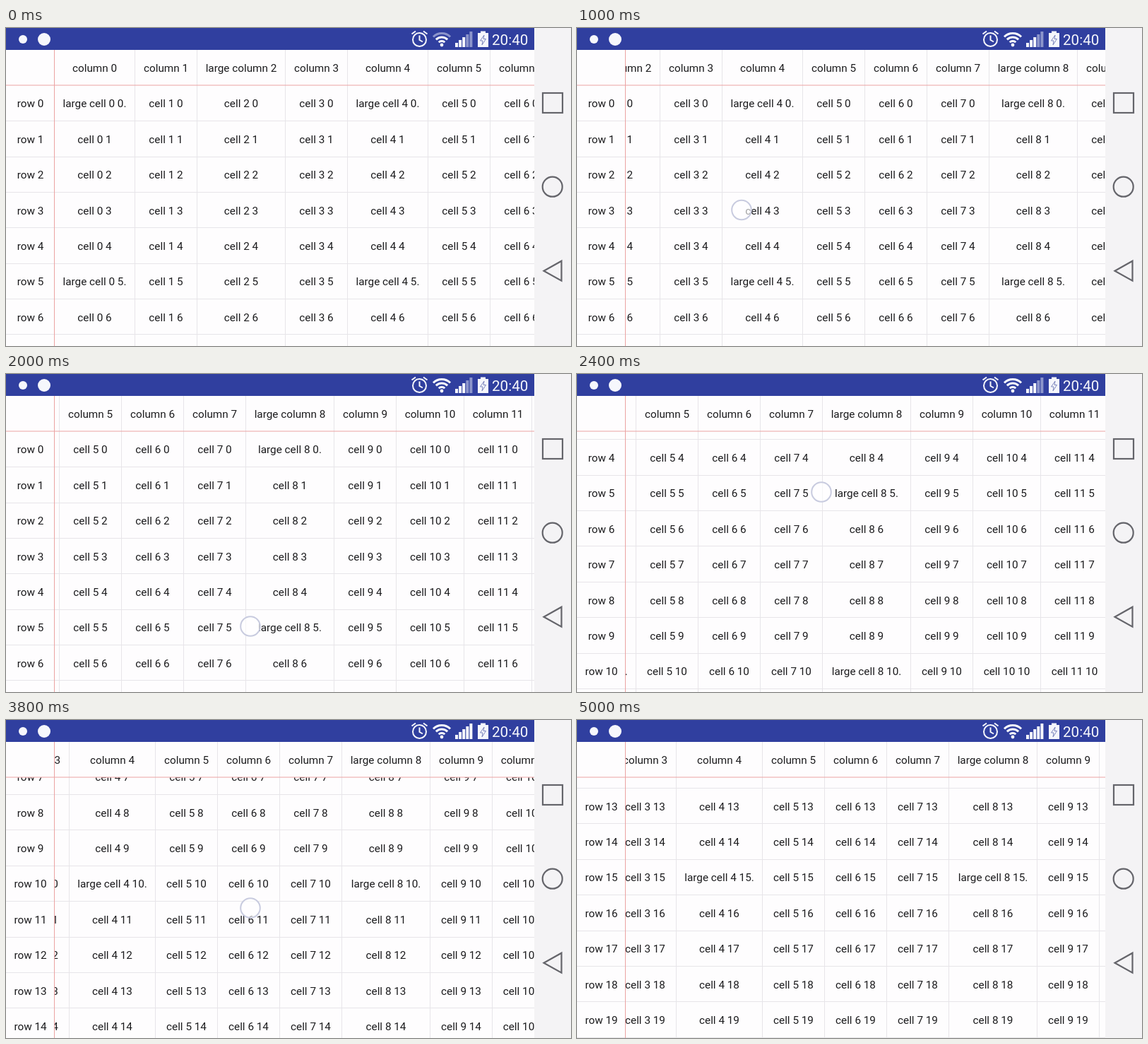
Animation of 800 by 450 pixels, one loop 5.1 s. Source, as an HTML page with a canvas:

```html
<!DOCTYPE html>
<html>
<head>
<meta charset="utf-8">
<style>
html, body { margin: 0; width: 800px; height: 450px; overflow: hidden; background: #fefdfe; }
canvas { display: block; }
</style>
</head>
<body>
<canvas id="stage" width="800" height="450"></canvas>
<script>
const ctx = document.getElementById('stage').getContext('2d');
const LOOP = 5100, STEP = 100;
const LEFT = 68.5, TOP = 81.2, BAR = 31, RIGHT = 748, ROW = 50.4;

// Each gesture: finger drag from start to lift, then a fling until end.
const gestures = [
  { axis: 'x', start: 400, lift: 1000, end: 1600, gone: 1300, from: 0, mid: 278, to: 522, power: 1.5, at: [511, 257.5] },
  { axis: 'y', start: 2000, lift: 2400, end: 2800, gone: 2700, from: 0, mid: 190, to: 379, power: 1.5, at: [346, 357] },
  { axis: 'x', start: 3400, lift: 3900, end: 4200, gone: 4400, from: 522, mid: 362, to: 343, power: 1, at: [218, 266] },
  { axis: 'y', start: 4600, lift: 4800, end: 5000, gone: 4900, from: 379, mid: 510, to: 640, power: 1.5, at: [346, 357] }
];

const clamp = v => Math.max(0, Math.min(1, v));
const progress = (t, a, b) => clamp((t - a) / (b - a));

function dragged(g, t) {
  return g.from + (g.mid - g.from) * progress(t, g.start, g.lift) ** g.power;
}
function scrolled(g, t) {
  const rest = 1 - progress(t, g.lift, g.end);
  return dragged(g, t) + (g.to - g.mid) * (1 - rest * rest);
}

function columnWidth(c, y) {
  if (c % 6 === 2) return 125;
  if (c === 4 && y > 135) return 122; // wider once row 10 is in view
  if (c % 4 === 0) return 114;
  return c < 10 ? 88 : 96;
}

function region(x, y, w, h, draw) {
  ctx.save();
  ctx.beginPath();
  ctx.rect(x, y, w, h);
  ctx.clip();
  draw();
  ctx.restore();
}

function stroke(color, width, ...points) {
  ctx.beginPath();
  points.forEach(p => ctx.lineTo(...p));
  ctx.strokeStyle = color;
  ctx.lineWidth = width;
  ctx.stroke();
}

function arc(x, y, r, a = 0, b = 2 * Math.PI) {
  ctx.beginPath();
  ctx.arc(x, y, r, a, b);
}

function label(text, x, top) {
  ctx.fillStyle = '#1b1b1d';
  ctx.fillText(text, x, top + 31.1);
}

function drawTable(x, y) {
  const grid = '#e7e5e9';
  const columns = [], rows = [];
  for (let c = 0, left = LEFT - x; left < RIGHT; c++) {
    const width = columnWidth(c, y);
    if (left + width > LEFT) columns.push({ c, center: left + width / 2, right: left + width });
    left += width;
  }
  for (let r = Math.floor(y / ROW); TOP + r * ROW - y < 450; r++) rows.push({ r, top: TOP + r * ROW - y });

  ctx.font = '15.3px Roboto, sans-serif';
  ctx.textAlign = 'center';
  region(LEFT, BAR, RIGHT - LEFT, 450 - BAR, () => {
    for (const { c, center, right } of columns) {
      const edge = Math.floor(right) + 0.5;
      stroke(grid, 1, [edge, BAR], [edge, 450]);
      label((c % 6 === 2 ? 'large column ' : 'column ') + c, center, BAR + 0.3);
    }
  });
  region(0, TOP, RIGHT, 450 - TOP, () => {
    for (const { r, top } of rows) {
      const edge = Math.floor(top + ROW) + 0.5;
      stroke(grid, 1, [0, edge], [RIGHT, edge]);
      label('row ' + r, 34.5, top);
    }
  });
  region(LEFT, TOP, RIGHT - LEFT, 450 - TOP, () => {
    for (const { r, top } of rows) for (const { c, center } of columns) {
      const large = c % 4 === 0 && r % 5 === 0;
      label(large ? `large cell ${c} ${r}.` : `cell ${c} ${r}`, center, top);
    }
  });
  stroke('#eba3a3', 1, [LEFT, BAR], [LEFT, 450]);
  stroke('#eba3a3', 1, [0, 81], [RIGHT, 81]);
}

function drawStatusBar(t) {
  const white = '#f6f7fc', dim = '#8c95cb', blue = '#303f9f';
  ctx.fillStyle = blue;
  ctx.fillRect(0, 0, RIGHT, BAR);
  ctx.fillStyle = white;
  arc(24, 16, 6);
  ctx.fill();
  arc(54, 16, 9);
  ctx.fill();

  // alarm clock
  arc(585.5, 16.5, 9.5);
  ctx.strokeStyle = white;
  ctx.lineWidth = 2;
  ctx.stroke();
  stroke(white, 2, [585.5, 10.5], [585.5, 17], [590, 19.5]);
  stroke(white, 2, [574.5, 8.5], [580, 4.5]);
  stroke(white, 2, [591, 4.5], [596.5, 8.5]);

  // wireless
  [6, 11.5, 17].forEach((r, i) => {
    arc(617, 24.5, r, -Math.PI * 0.75, -Math.PI * 0.25);
    ctx.strokeStyle = i === 2 && t < 400 ? dim : white;
    ctx.lineWidth = 3;
    ctx.stroke();
  });
  arc(617, 24, 2.4);
  ctx.fill();

  // signal strength
  for (let i = 0; i < 5; i++) {
    ctx.fillStyle = i < (t < 3400 ? 3 : 5) ? white : dim;
    const h = 6 + i * 4;
    ctx.fillRect(636 + i * 5.1, 27 - h, 4, h);
  }

  // battery
  ctx.fillStyle = white;
  ctx.fillRect(668, 7, 15, 20);
  ctx.fillRect(672, 4.5, 7, 3);
  ctx.beginPath();
  [[677, 10], [671.5, 18], [675, 18], [674, 24], [679.5, 15.5], [676, 15.5]].forEach(p => ctx.lineTo(...p));
  ctx.closePath();
  ctx.strokeStyle = '#7d86bd';
  ctx.lineWidth = 1;
  ctx.stroke();

  ctx.font = '20.6px Roboto, sans-serif';
  ctx.textAlign = 'left';
  ctx.fillText('20:40', 688, 23.6);
}

function drawNavigation() {
  ctx.fillStyle = '#f4f3f5';
  ctx.fillRect(RIGHT, 0, 800 - RIGHT, 450);
  ctx.strokeStyle = '#65656b';
  ctx.lineWidth = 2.2;
  ctx.strokeRect(760, 92, 28, 28);
  arc(773.7, 224.7, 14);
  ctx.stroke();
  ctx.beginPath();
  [[761.5, 343.7], [786.5, 329.7], [786.5, 357.7]].forEach(p => ctx.lineTo(...p));
  ctx.closePath();
  ctx.stroke();
}

function drawTouch(g, t) {
  const [x, y] = g.at, shift = g.from - dragged(g, t);
  ctx.globalAlpha = 1 - progress(t, g.lift, g.gone);
  arc(x + (g.axis === 'x' ? shift : 0), y + (g.axis === 'y' ? shift : 0), 13.8);
  ctx.fillStyle = 'rgba(255,255,255,.6)';
  ctx.fill();
  ctx.strokeStyle = '#c8cbdf';
  ctx.lineWidth = 2;
  ctx.stroke();
  ctx.globalAlpha = 1;
}

function draw(now) {
  const t = Math.floor((now % LOOP) / STEP) * STEP;
  const scroll = { x: 0, y: 0 };
  const begun = gestures.filter(g => t >= g.start);
  for (const g of begun) scroll[g.axis] = scrolled(g, t);

  ctx.fillStyle = '#fefdfe';
  ctx.fillRect(0, 0, 800, 450);
  drawTable(scroll.x, scroll.y);
  drawStatusBar(t);
  drawNavigation();
  begun.filter(g => t < g.gone).forEach(g => drawTouch(g, t));
}

const began = performance.now();
function tick() {
  draw(performance.now() - began);
  requestAnimationFrame(tick);
}
tick();
</script>
</body>
</html>
```
